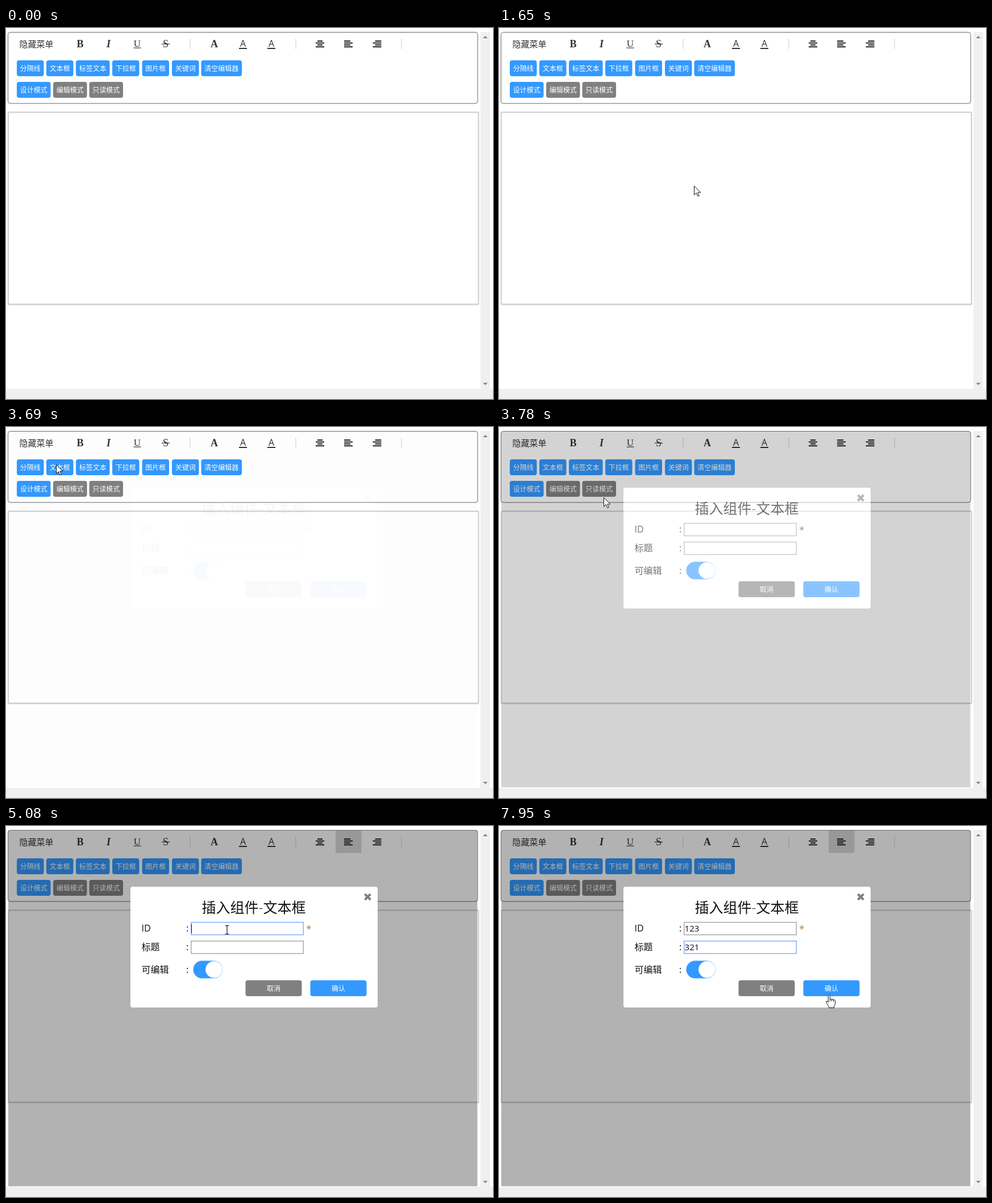
Animation of 857 by 654 pixels, one loop 8 s. Source, as an HTML page:

```html
<!DOCTYPE html>
<html lang="zh-CN">
<head>
<meta charset="utf-8">
<style>
  html, body { margin: 0; width: 100%; height: 100%; overflow: hidden; background: #fff; }
  svg { display: block; width: 857px; height: 654px; }
  text { font-family: "Open Sans", "Noto Sans CJK SC", "Noto Sans CJK", sans-serif; white-space: pre; }
  .serif { font-family: "Liberation Serif", serif; }
</style>
</head>
<body>
<svg id="stage" viewBox="0 0 857 654" xmlns="http://www.w3.org/2000/svg"></svg>
<script>
const BLUE = "#3399ff", GRAY = "#808080", INK = "#333";
const LOOP = 8000;

const rect = (x, y, w, h, fill, extra = "") =>
  `<rect x="${x}" y="${y}" width="${w}" height="${h}" fill="${fill}" ${extra}/>`;
const path = (d, extra) => `<path d="${d}" ${extra}/>`;
const label = (x, y, size, s, fill = INK, extra = "") =>
  `<text x="${x}" y="${y}" font-size="${size}" fill="${fill}" ${extra}>${s}</text>`;
const mid = 'text-anchor="middle"';
const glyph = (x, s, style = "") => label(x, 34, 18, s, INK, `${mid} class="serif" ${style}`);

const button = (x, y, w, s, fill, weight = 400) =>
  rect(x, y, w, 28, fill, 'rx="4"') +
  label(x + w / 2, y + 19, 12, s, "#fff", `${mid} font-weight="${weight}"`);

// Four bars, the odd ones shorter; anchor 0 = left, .5 = centre, 1 = right
const align = (x, anchor, short) => [0, 1, 2, 3].map(i => {
  const w = i % 2 ? 15 : short;
  return rect(x + (15 - w) * anchor, 22 + i * 3.4, w, 2, "#222");
}).join("");

const underA = x => label(x, 33, 16, "A", INK, mid) + rect(x - 7, 35, 14, 2, INK);

const insertButtons = [[19, "分隔线"], [71, "文本框"], [123, "标签文本"], [187, "下拉框"],
  [239.5, "图片框"], [292, "关键词"], [343.5, "清空编辑器"]];
const modeButtons = [[19, "设计模式", BLUE], [83, "编辑模式", GRAY], [146.5, "只读模式", GRAY]];
const buttonWidth = s => s.length * 12 + 11.5;

function toolbar() {
  return rect(3.5, 7.5, 826.5, 125.5, "#fff", 'rx="4" stroke="#666"') +
    rect(580, 8, 45.5, 39.5, "#dadada", 'id="hover"') +
    label(23.5, 33.5, 15, "隐藏菜单") +
    glyph(130.5, "B", 'font-weight="700"') +
    glyph(180.5, "I", 'font-weight="700" font-style="italic"') +
    label(231, 33, 17, "U", INK, `${mid} class="serif"`) + rect(224.5, 34.5, 13, 1.2, INK) +
    glyph(281, "S") + rect(274, 27.7, 14, 1.2, INK) +
    glyph(366.5, "A", 'font-weight="700"') +
    underA(417) + underA(467) +
    align(545, .5, 9) + align(595, 0, 11) + align(645.5, 1, 11) +
    [323.5, 509.5, 695.5].map(x => rect(x, 19, 1, 18, "#ccc")).join("") +
    insertButtons.map(([x, s]) => button(x, 57, buttonWidth(s), s, BLUE)).join("") +
    modeButtons.map(([x, s, c]) => button(x, 95, buttonWidth(s), s, c)).join("");
}

const field = (n, y) =>
  rect(325.75, y + .75, 197.5, 22, "#fff", `id="box${n}" stroke-width="1.5"`) +
  label(326.5, y + 17, 15.2, "", "#111", `id="value${n}"`);

const row = (y, s) => label(238.5, y, 16, s, "#111") + label(317, y, 16, ":", "#111");

function dialog() {
  return `<g id="dialog">` +
    rect(4, 8, 825.5, 627, "#000", 'opacity=".3"') +
    rect(219, 107, 435, 213, "#fff", 'rx="4"') +
    label(436, 152.5, 25, "插入组件-文本框", "#111", `${mid} font-weight="300"`) +
    path("M631.5 120 l10 10 m0 -10 l-10 10", `stroke="${GRAY}" stroke-width="4" fill="none"`) +
    row(186, "ID") + row(219, "标题") + row(258.5, "可编辑") +
    field(0, 169) + field(1, 202) +
    label(528.5, 187, 16, "*", "#c07020", 'id="star"') +
    rect(329.5, 237.5, 51.5, 31, BLUE, 'rx="15.5"') +
    `<circle cx="366" cy="253" r="14.8" fill="#fff"/>` +
    button(421.5, 272, 99, "取消", GRAY, 500) +
    button(535.5, 272, 99, "确认", BLUE, 500) +
    rect(0, 0, 1, 16, "#222", 'id="caret"') + `</g>`;
}

function pointers() {
  const skin = 'fill="#fff" stroke="#111" stroke-linejoin="round"';
  const arrow = path("M.5 .5 V16.2 L4.2 12.8 L6.8 18.6 L9.3 17.5 L6.7 12 H11.8 Z", skin);
  const hand = path("M-1.7 14 V1.6 Q-.2 -.6 1.4 1.6 V8.5 Q3 7 4.5 8.7 Q6 7.5 7.5 9.3 " +
    "Q10 8.6 10.5 11 V16.5 Q10.3 19 8.5 21 V23.5 H-.5 V21.5 L-5 14.5 Q-6.2 11.5 -3.7 11.6 Z", skin) +
    path("M1.4 8.5 V12 M4.5 8.7 V12.3 M7.5 9.3 V12.6", 'stroke="#111" fill="none"');
  const beam = path("M-3.5 -7.5 H-1 L0 -6.5 L1 -7.5 H3.5 M0 -6.5 V6.5 M-3.5 7.5 H-1 L0 6.5 L1 7.5 H3.5",
    'stroke="#111" stroke-width="1.2" fill="none"');
  return Object.entries({ arrow, hand, beam }).map(([id, s]) => `<g id="${id}">${s}</g>`).join("");
}

const stage = document.getElementById("stage");
stage.innerHTML =
  `<defs><filter id="soft" x="-5%" y="-5%" width="110%" height="110%"><feGaussianBlur stdDeviation="1.2"/></filter></defs>` +
  rect(0, 0, 857, 654, "#fff") +
  rect(835, 7, 17, 629, "#f0f0f0") + rect(0, 636, 857, 18, "#f0f0f0") +
  path("M839.5 18 L843.5 14 L847.5 18 Z M839.5 625.5 L843.5 629.5 L847.5 625.5 Z", `fill="${GRAY}"`) +
  toolbar() +
  rect(4.5, 149, 826.5, 338, "none", 'stroke="#bbb" stroke-width="2" filter="url(#soft)"') +
  rect(4.5, 149, 826.5, 337.5, "#fff", 'stroke="#c4c4c4"') +
  dialog() + pointers();

const el = id => document.getElementById(id);
const show = (node, on) => node.setAttribute("visibility", on ? "visible" : "hidden");
const [hover, modal, star, caret] = ["hover", "dialog", "star", "caret"].map(el);
const boxes = [el("box0"), el("box1")], values = [el("value0"), el("value1")];
const shapes = ["arrow", "hand", "beam"];

// Pointer runs: start, end, number of jumps, final x, y
const START = [799, 688];
const runs = [
  [540, 700, 3, 658, 523], [1030, 1170, 3, 451, 363],
  [1330, 1330, 1, 468, 374], [1410, 1650, 4, 343, 278],
  [1930, 2580, 9, 138, 99], [2840, 2970, 3, 84, 49],
  [3140, 3210, 2, 84, 66], [3280, 3280, 1, 89, 54], [3450, 3550, 2, 82, 54],
  [3690, 3690, 1, 88, 66], [3780, 3780, 1, 184, 124], [3850, 3850, 1, 234, 133],
  [3920, 4440, 8, 389, 202], [4540, 4910, 5, 389, 178], [5080, 5450, 5, 389, 205],
  [6000, 6070, 2, 381, 213], [6550, 6630, 2, 417, 222], [6890, 6890, 1, 416, 224],
  [7340, 7950, 8, 581, 297]
];
const fades = [[3690, .03], [3780, .57], [3850, .93], [3920, 1]];
const focusTimes = [4630, 6220];
const typing = [
  [[5630, "1"], [5800, "2"], [5900, "3"]],
  [[7180, "3"], [7260, "2"], [7420, "1"]]
];

function pointerAt(t) {
  let [x, y] = START;
  for (const [t0, t1, n, tx, ty] of runs) {
    if (t < t0) break;
    const done = t >= t1 ? n : 1 + Math.floor((t - t0) / (t1 - t0) * (n - 1) + 1e-6);
    x += (tx - x) * done / n;
    y += (ty - y) * done / n;
    if (done < n) break;
  }
  return [x, y];
}

const inside = (x, y, l, top, w, h) => x >= l && x <= l + w && y >= top && y <= top + h;

function shapeAt(x, y, open) {
  if (open) {
    if ([169, 202].some(top => inside(x, y, 325, top, 199, 23))) return "beam";
    return [421, 535].some(l => inside(x, y, l, 272, 99, 28)) ? "hand" : "arrow";
  }
  const over = (list, top) => list.some(([l, s]) => inside(x, y, l, top, buttonWidth(s), 28));
  return over(insertButtons, 57) || over(modeButtons, 95) || inside(x, y, 71, 49, 48, 36) ? "hand" : "arrow";
}

function draw(t) {
  const fade = fades.reduce((a, [at, v]) => t >= at ? v : a, 0);
  modal.setAttribute("opacity", fade);
  show(modal, fade > 0);
  star.setAttribute("fill", fade < 1 ? "#444" : "#c07020");
  show(hover, t >= focusTimes[0]);

  const focus = focusTimes.filter(at => t >= at).length - 1;
  boxes.forEach((b, i) => b.setAttribute("stroke", i === focus ? "#85b1fa" : "#aaa"));
  const typed = typing.map(keys => keys.filter(([at]) => t >= at));
  values.forEach((v, i) => v.textContent = typed[i].map(k => k[1]).join(""));

  let lit = false;
  if (focus >= 0) {
    const keys = typed[focus];
    const since = keys.length ? keys[keys.length - 1][0] : focusTimes[focus];
    lit = (t - since) % 1000 < 500;
    caret.setAttribute("x", 326 + keys.length * 8.7);
    caret.setAttribute("y", focus ? 206 : 173);
  }
  caret.style.display = lit ? "" : "none";

  const [x, y] = pointerAt(t), kind = shapeAt(x, y, fade > 0);
  for (const id of shapes) {
    const node = el(id);
    show(node, id === kind && t >= runs[0][0]);
    node.setAttribute("transform", `translate(${Math.round(x)} ${Math.round(y)})`);
  }
}

function tick() {
  draw(performance.now() % LOOP);
  requestAnimationFrame(tick);
}
tick();
</script>
</body>
</html>
```
